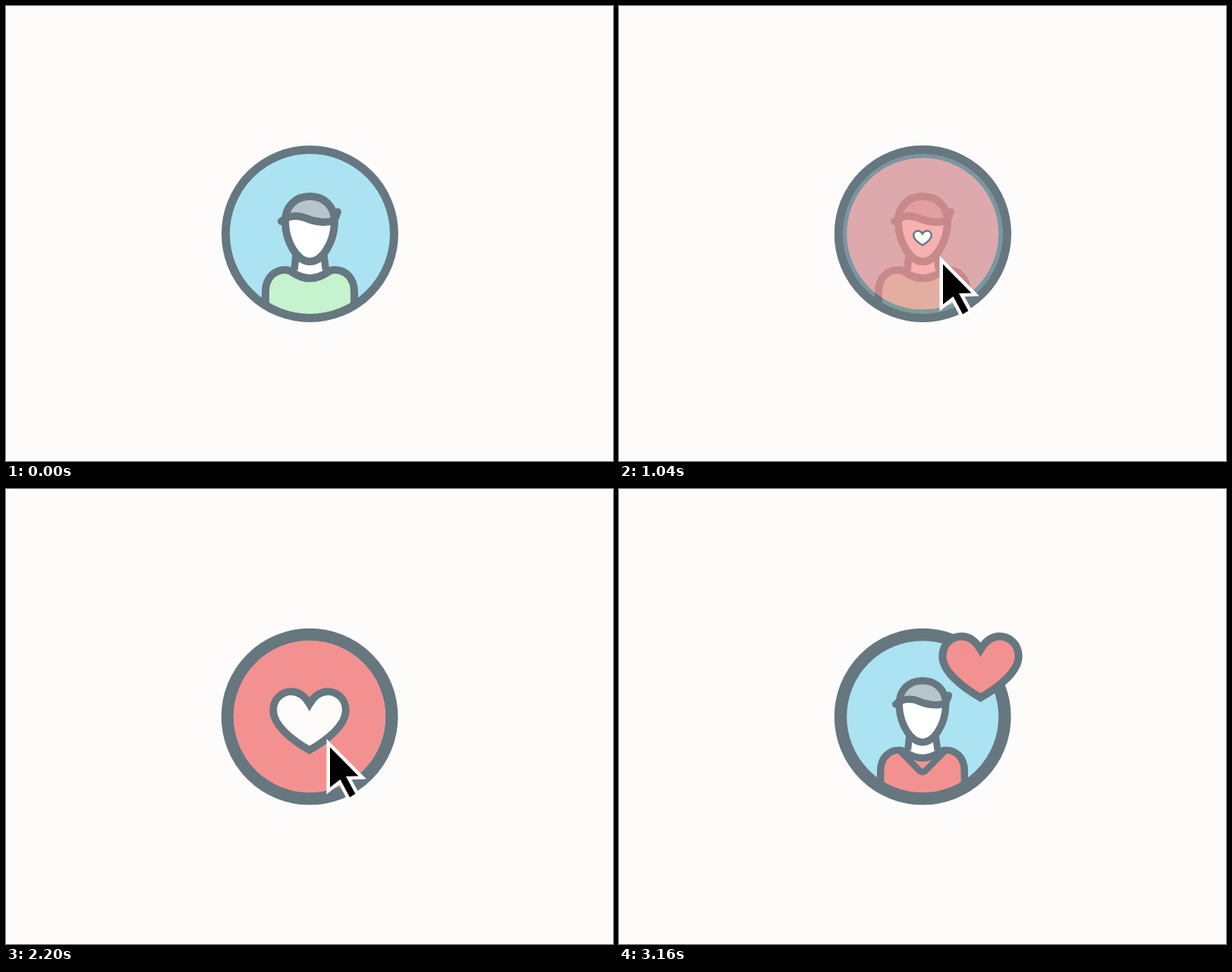
Write an HTML page with a canvas that moves like this. It is 800 px wide and 600 px high and loops after 5400 ms.

```html
<!DOCTYPE html>
<html lang="en">
<head>
<meta charset="utf-8">
<title>Avatar like</title>
<style>
html, body { margin: 0; width: 100%; height: 100%; overflow: hidden; background: #fefcfa; }
canvas { display: block; width: 800px; height: 600px; }
</style>
</head>
<body>
<canvas id="stage" width="800" height="600"></canvas>
<script>
const ctx = document.getElementById('stage').getContext('2d');
const LOOP = 5400, STEP = 40, TAU = Math.PI * 2;
const PAPER = '#fefcfa', LINE = '#667780', SKY = '#abe3f2',
      GREEN = '#c4f3ce', RED = '#f39190', HAIR = '#b7c4cb';

const shapes = {
  shirt: new Path2D('M342 420V377C342 358 354 348 368 348Q373 348 377 351Q400.5 367 424 351Q428 348 433 348C447 348 459 358 459 377V420'),
  neckFill: new Path2D('M382 328L380 350Q400.5 367 421 350L419 328Z'),
  neckLines: new Path2D('M382 329L380 348M419 329L421.5 348'),
  vee: new Path2D('M369 349L396 376.5Q400.5 380.5 405 376.5L432 349'),
  head: new Path2D('M368 286C367 264 382 251 400.5 251S434 264 433 286C432 312 417 337 400.5 337S369 312 368 286Z'),
  hair: new Path2D('M363 284C372 276 385 275 396 280S424 288 431 282V240H363Z'),
  fringe: new Path2D('M363 284C372 276 385 275 396 280S424 287 433 282L437 271.5'),
  heart: new Path2D('M0-22.5C5-31 13-39 24-39C37.5-39 48-28.5 48-14C48 6 22 25.8 0 38.5C-22 25.8-48 6-48-14C-48-28.5-37.5-39-24-39C-13-39-5-31 0-22.5Z'),
  cursor: new Path2D('M0 0L37.5 38L21 38.5L33.5 61.5L26 66L13.5 42.5L0 53Z')
};

const clamp = v => Math.max(0, Math.min(1, v));
const span = (t, a, b) => clamp((t - a) / (b - a));
const ease = p => (1 - Math.cos(Math.PI * p)) / 2;
const mix = (a, b, p) => a + (b - a) * p;

function fill(path, color) {
  ctx.fillStyle = color;
  ctx.fill(path);
}

function stroke(path, width, color = LINE) {
  ctx.strokeStyle = color;
  ctx.lineWidth = width;
  ctx.stroke(path);
}

function circle(x, y, r) {
  const p = new Path2D();
  p.arc(x, y, r, 0, TAU);
  return p;
}

// Runs draw inside a moved and scaled copy of the stage.
function at(x, y, scale, draw) {
  ctx.save();
  ctx.translate(x, y);
  ctx.scale(scale, scale);
  draw();
  ctx.restore();
}

function heart(x, y, scale, color) {
  if (scale < 0.005) return;
  at(x, y, scale, () => {
    fill(shapes.heart, color);
    stroke(shapes.heart, 9.8);
  });
}

function body(color, vee) {
  ctx.save();
  ctx.clip(circle(400.5, 300.5, 111));
  fill(shapes.neckFill, '#fff');
  stroke(shapes.neckLines, 9.5);
  fill(shapes.shirt, color);
  stroke(shapes.shirt, 10);
  if (vee) stroke(shapes.vee, 9);
  ctx.restore();
}

function head() {
  fill(shapes.head, '#fff');
  ctx.save();
  ctx.clip(shapes.head);
  fill(shapes.hair, HAIR);
  ctx.restore();
  stroke(shapes.head, 10);
  ctx.lineCap = 'round';
  stroke(shapes.fringe, 10);
  ctx.lineCap = 'butt';
}

const ring = () => stroke(circle(400.5, 300.5, 111), 11);
const thickRing = () => stroke(circle(400.2, 300.2, 108.2), 16.4);

function plainAvatar() {
  fill(circle(400.5, 300.5, 110), SKY);
  body(GREEN, false);
  ring();
  head();
}

function likedAvatar(t) {
  const small = draw => at(400 - 400.5 * 0.945, 15.5, 0.945, draw);
  const p = ease(span(t, 2480, 2860));
  fill(circle(400.5, 300.5, 110), SKY);
  small(() => body(RED, true));
  thickRing();
  heart(mix(400, 476.5, p), mix(322, 235, p), 1.043 * p, RED);
  small(head);
}

function heartScale(t) {
  if (t < 1240) return 1.3 * ease(span(t, 960, 1240));
  if (t < 2190) return mix(1.3, 1, ease(span(t, 1240, 1480)));
  return 1 - ease(span(t, 2190, 2440));
}

function cursor(t) {
  if (t < 240 || t >= 3160) return;
  const p = span(t, 240, 838), away = Math.max(0, t - 2482);
  const x = mix(740, 427, p) + 0.444 * away;
  const y = mix(592, 340.4, p) + 0.4 * away;
  at(x, y, 1, () => {
    stroke(shapes.cursor, 9, '#fff');
    fill(shapes.cursor, '#000');
  });
}

function render(t) {
  ctx.fillStyle = PAPER;
  ctx.fillRect(0, 0, 800, 600);
  const liked = t >= 2190;
  if (liked) likedAvatar(t); else plainAvatar();

  ctx.globalAlpha = liked ? 1 - span(t, 2320, 2560) : span(t, 800, 1140);
  if (ctx.globalAlpha > 0) {
    fill(circle(400, 300, 100.2), RED);
    if (!liked) thickRing();
  }
  ctx.globalAlpha = 1;

  heart(400, 306, heartScale(t), PAPER);
  cursor(t);
}

const start = performance.now();
function tick() {
  const t = (performance.now() - start) % LOOP;
  render(Math.floor(t / STEP) * STEP);
  requestAnimationFrame(tick);
}
tick();
</script>
</body>
</html>
```
